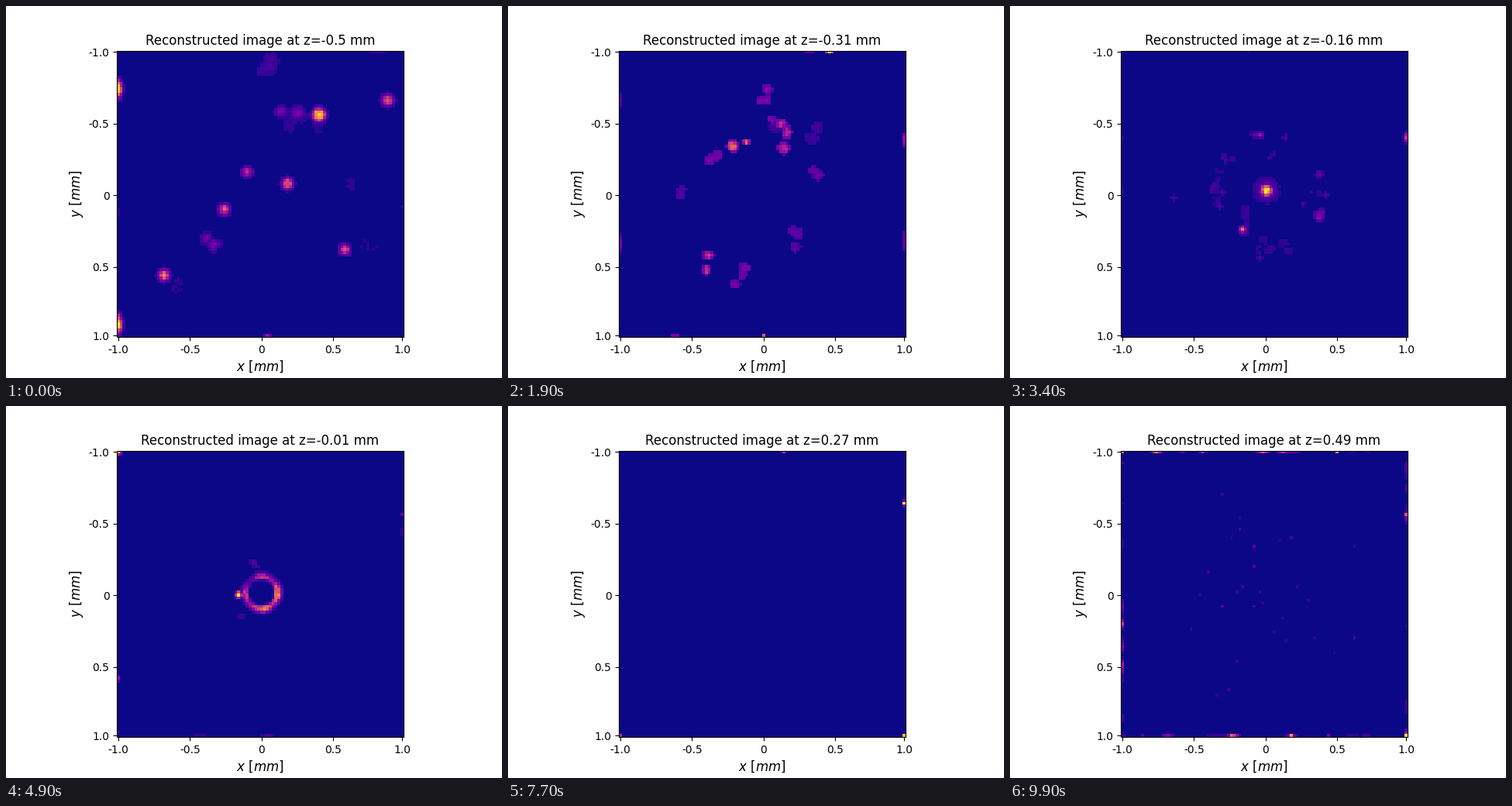
A matplotlib script for the animation above (10 s loop, 640 by 480 pixels).

```python
import numpy as np
import matplotlib.pyplot as plt
from matplotlib.animation import FuncAnimation

N = 100          # grid cells per side, 0.02 mm each
FRAMES = 100
FLOOR = 0.05     # weaker signal is cut to zero

rng = np.random.default_rng(11)
rows, cols = np.mgrid[0:N, 0:N].astype(float)
grain = rng.uniform(0.82, 1.18, (N, N))
spots = []


def spot_size(z):
    """Spots are broad far in front of the focus and one cell wide behind it."""
    return 1.7 + 6 * z * z if z < 0 else 0.9


def add(z, life, col, row, w, h, strength):
    spots.append((z, life, col, row, w, h, strength))


def bright(z, *points):
    """Strong spots (col, row, strength) that peak at depth z."""
    for col, row, strength in points:
        w = h = spot_size(z) * (0.75 + 0.35 * strength)
        on_side, on_end = col in (0, N - 1), row in (0, N - 1)
        if on_side and not on_end:
            w, h = 0.7 * w, 1.5 * h
        elif on_end and not on_side:
            w, h = 1.4 * w, 0.8 * h
        add(z, 0.05 if on_side or on_end else 0.08, col, row, w, h, strength)


def faint():
    return 0.06 + 0.3 * rng.random() ** 4


def wisps(count):
    """Short faint trails that close in on the centre towards the focus."""
    for _ in range(count):
        z = rng.uniform(-0.56, -0.03)
        angle = rng.uniform(0, 2 * np.pi)
        reach = 8 + 80 * abs(z) * rng.uniform(0.4, 1)
        x, y = 50 + reach * np.cos(angle), 49 + reach * np.sin(angle)
        strength = faint()
        for _ in range(rng.integers(1, 4)):
            w, h = spot_size(z) * rng.uniform(0.6, 1.1, 2)
            add(z, 0.05, x, y, w, h, strength)
            x, y = x + rng.normal(0, w), y + rng.normal(0, h)


def border(count, lo, hi, life, strength, ramp=1.0):
    """Artefacts along the four edges."""
    for _ in range(count):
        z = lo + (hi - lo) * rng.random() ** ramp
        pos, side = rng.integers(N), rng.integers(4)
        half, thin = rng.uniform(0.7, 3.5), 0.8
        s, edge = strength(), (N - 1) * (side % 2)
        if side < 2:
            add(z, life, edge, pos, thin, half, s)
        else:
            add(z, life, pos, edge, half, thin, s)


def speckle(count):
    """Single cells that appear behind the focus."""
    for _ in range(count):
        z = 0.33 + 0.19 * rng.random() ** 0.5
        x, y = np.clip(np.rint(rng.normal(51, 18, 2)), 1, N - 2)
        add(z, 0.02, x, y, 0.7, 0.7, 0.07 + 0.15 * rng.random() ** 4)


bright(-0.5, (70, 22, 1), (94, 17, .58), (59, 46, .55), (37, 55, .5),
       (79, 69, .47), (16, 78, .6), (45, 42, .38), (0, 13, .8), (0, 95, .85))
bright(-0.4, (51, 14, .45), (23, 33, .5), (39, 30, .42), (62, 42, .42),
       (56, 67, .48), (42, 77, .6), (57, 0, 1), (99, 63, .7), (48, 99, .9))
bright(-0.23, (46, 29, .7), (18, 51, .55), (35, 49, .6), (34, 54, .7),
       (71, 50, .6), (48, 72, .5), (11, 99, .68), (30, 99, .6), (99, 0, 1))
bright(-0.16, (42, 62, .66), (48, 29, .36), (99, 30, .4))
bright(-0.01, (42, 50, 1), (0, 0, .95))
bright(0.27, (57, 0, .55), (99, 18, 1), (99, 99, 1), (0, 99, .45))
bright(0.49, (99, 99, 1), (0, 0, .85))

wisps(75)
speckle(130)
border(70, -0.56, 0.25, 0.04, faint)
border(190, 0.3, 0.52, 0.025, lambda: 0.08 + 0.85 * rng.random() ** 3, ramp=0.6)


def shell(z):
    """Hollow sphere: a ring at mid depth, a bright cap at its poles."""
    cap = min(abs(z) / .15, 1) ** 4
    weight = max(0, 1 - (max(abs(z) - .16, 0) / .05) ** 2)
    radius = 5.4 * np.sqrt(max(0, 1 - (z / .15) ** 2))
    dx, dy = cols - 50 - .3 * cap, rows - 49.2 + .8 * cap
    dist, angle = np.hypot(dx, dy), np.arctan2(dy, dx)
    width = np.where(dist < radius, .8, 1.5) * (1 - cap) + 1.9 * cap
    ring = np.exp(-((dist - radius) / width) ** 2)
    tone = .47 + .17 * np.cos(angle - .75) + .15 * np.cos(4 * angle)
    halo = .17 * cap * np.exp(-(dist / 4.5) ** 2)
    return weight * np.maximum(ring * (tone * (1 - cap) + cap), halo)


def slice_at(z):
    img = shell(z)
    for z0, life, c, r, w, h, s in spots:
        weight = 1 - ((z - z0) / life) ** 2
        if weight > 0:
            d2 = ((cols - c) / w) ** 2 + ((rows - r) / h) ** 2
            glow = s * weight * np.exp(-np.log(s / FLOOR) * d2)
            img = np.maximum(img, np.where(d2 <= 1, glow, 0))
    img = img * grain
    img = img / img.max()
    return np.where(img < FLOOR, 0, img)


plt.rcParams['font.family'] = 'DejaVu Sans'
fig, ax = plt.subplots(figsize=(6.4, 4.8), dpi=100)
image = ax.imshow(np.zeros((N, N)), cmap='plasma', vmin=0, vmax=1,
                  interpolation='nearest')
ticks, labels = [0, 25, 50, 75, 99], ['-1.0', '-0.5', '0', '0.5', '1.0']
ax.set_xticks(ticks, labels)
ax.set_yticks(ticks, labels)
ax.set_xlabel('$x$ $[mm]$', fontsize=12, labelpad=3)
ax.set_ylabel('$y$ $[mm]$', fontsize=12, labelpad=3)
title = ax.set_title('', pad=5.5)


def update(k):
    z = (k - 50) / 100
    image.set_data(slice_at(z))
    title.set_text(f'Reconstructed image at z={z} mm')
    return image, title


anim = FuncAnimation(fig, update, frames=FRAMES, interval=100, repeat=True,
                     repeat_delay=0, blit=False)
plt.show()
```
